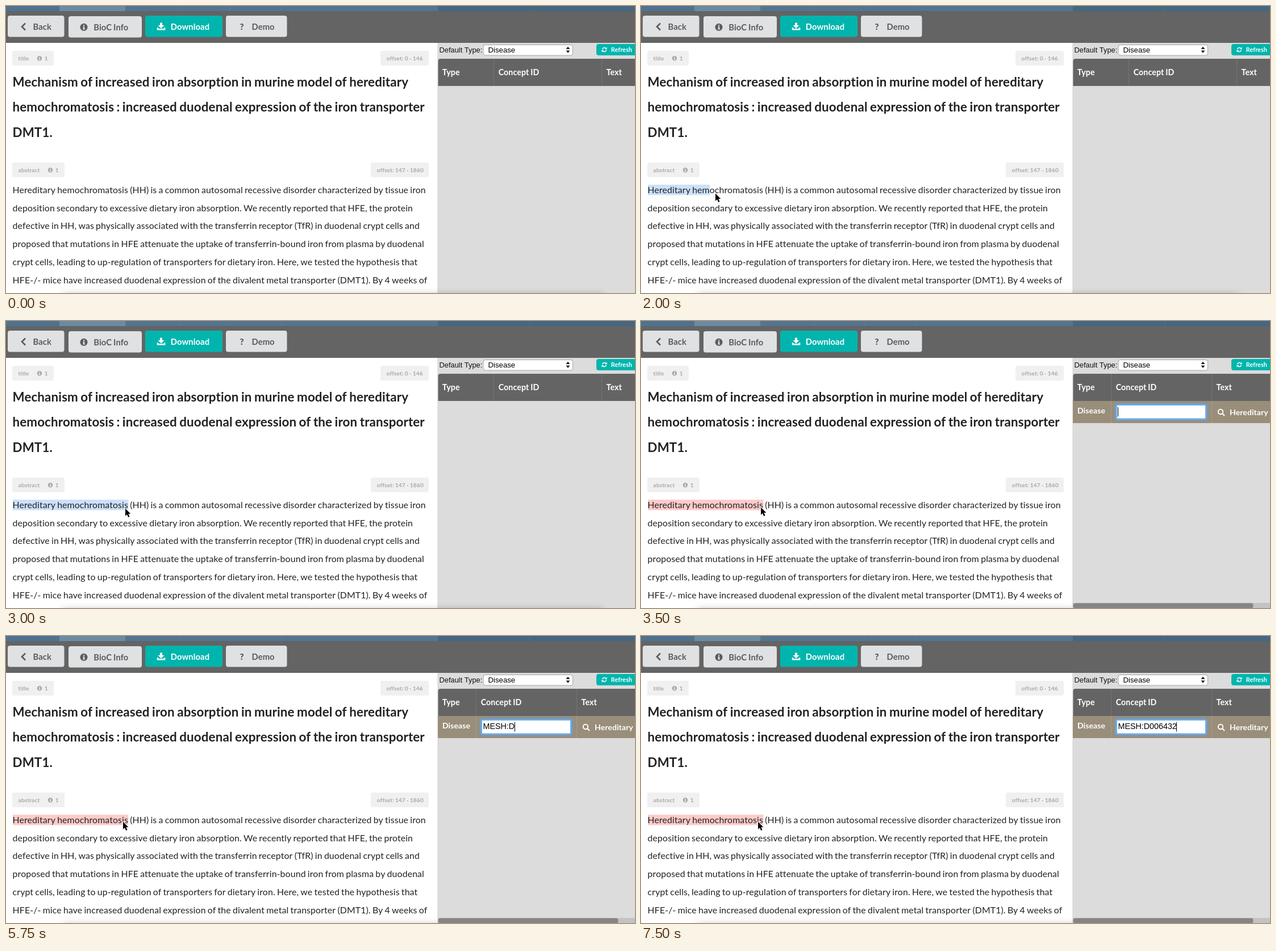
Animation of 1107x506 px, one loop 8 s. Source, as an HTML page with a canvas:

```html
<!DOCTYPE html>
<html lang="en">
<head>
<meta charset="utf-8">
<title>Annotation editor</title>
<style>
  html, body { margin: 0; width: 100%; height: 100%; overflow: hidden; background: #fff; }
  canvas { display: block; }
</style>
</head>
<body>
<canvas id="stage" width="1107" height="506"></canvas>
<script>
const ctx = document.getElementById('stage').getContext('2d');
const LOOP = 8000, ANNOTATED = 3500;
const INK = '#212121', GREY = '#646464', PANEL = '#dcdcdc', TEAL = '#00b5ad';
const BODY_SIZE = 15.85, SPACE_EM = 0.193;

const TITLE = [
  'Mechanism of increased iron absorption in murine model of hereditary',
  'hemochromatosis : increased duodenal expression of the iron transporter',
  'DMT1.'
];
const ABSTRACT = [
  'Hereditary hemochromatosis (HH) is a common autosomal recessive disorder characterized by tissue iron',
  'deposition secondary to excessive dietary iron absorption. We recently reported that HFE, the protein',
  'defective in HH, was physically associated with the transferrin receptor (TfR) in duodenal crypt cells and',
  'proposed that mutations in HFE attenuate the uptake of transferrin-bound iron from plasma by duodenal',
  'crypt cells, leading to up-regulation of transporters for dietary iron. Here, we tested the hypothesis that',
  'HFE-/- mice have increased duodenal expression of the divalent metal transporter (DMT1). By 4 weeks of'
];
const TERM = 'Hereditary hemochromatosis';
const CONCEPT = 'MESH:D006432';

// [time, pointer x, pointer y, selected characters]
const POINTER = [
  [500, -3, 305, 0], [750, 8.5, 319.5, 0], [1000, 10, 321, 0], [1250, 10.5, 329.5, 0],
  [1750, 44, 330.5, 3], [2000, 131, 330.5, 14], [2250, 180, 330.5, 20], [2500, 194, 330.5, 23],
  [2750, 203, 330.5, 24], [3000, 210, 330.5, 26], [3500, 211, 328.5, 26],
  [3750, 207, 328, 26], [4000, 206, 327.5, 26]
];
// [time, typed characters]
const TYPING = [
  [3500, 0], [4750, 2], [5000, 4], [5500, 5], [5750, 6],
  [6250, 7], [6500, 8], [7000, 9], [7250, 10], [7500, 12]
];

const stepAt = (steps, t) => steps.filter(s => s[0] <= t).pop();

function rect(x, y, w, h, color) {
  ctx.fillStyle = color;
  ctx.fillRect(x, y, w, h);
}

function rounded(x, y, w, h, r, color) {
  ctx.beginPath();
  ctx.roundRect(x, y, w, h, r);
  ctx.fillStyle = color;
  ctx.fill();
}

function useArial(size) {
  ctx.font = `${size}px "Liberation Sans", Arial, sans-serif`;
  ctx.letterSpacing = ctx.wordSpacing = '0px';
}

// Narrow word gaps and slightly open letters; any letter spacing also turns ligatures off.
function useLato(size, weight = 400) {
  ctx.font = `${weight} ${size}px Lato, sans-serif`;
  ctx.letterSpacing = ctx.wordSpacing = '0px';
  const slack = ctx.measureText(' ').width - SPACE_EM * size;
  ctx.letterSpacing = `${Math.max(0.01, slack * 0.12)}px`;
  ctx.wordSpacing = `${-slack}px`;
}

function text(str, x, y, color = INK) {
  ctx.fillStyle = color;
  ctx.fillText(str, x, y);
}

function bold(str, x, y, size, color) {
  useLato(size, 700);
  text(str, x, y, color);
}

function path(points, color, width) {
  ctx.beginPath();
  points.forEach(([x, y], i) => i ? ctx.lineTo(x, y) : ctx.moveTo(x, y));
  if (width) {
    ctx.strokeStyle = color;
    ctx.lineWidth = width;
    ctx.stroke();
  } else {
    ctx.fillStyle = color;
    ctx.fill();
  }
}

function arc(x, y, r, color, width, from = 0, to = Math.PI * 2) {
  ctx.beginPath();
  ctx.arc(x, y, r, from, to);
  ctx.strokeStyle = ctx.fillStyle = color;
  ctx.lineWidth = width;
  width ? ctx.stroke() : ctx.fill();
}

function infoIcon(x, y, r, color, hole) {
  const u = r / 6.5;
  arc(x, y, r, color);
  rect(x - u, y - 4.3 * u, 2.2 * u, 2 * u, hole);
  rect(x - 1.8 * u, y - 1.2 * u, 3 * u, 1.4 * u, hole);
  rect(x - u, y - 1.2 * u, 2.2 * u, 4.6 * u, hole);
  rect(x - 2 * u, y + 2.6 * u, 4.2 * u, 1.5 * u, hole);
}

function topBar() {
  rect(0, 0, 1107, 9, '#4f7290');
  rect(94, 0, 116, 9, '#6c8ba3');
  rect(210, 0, 550, 9, '#547591');
  rect(760, 0, 347, 9, '#456781');
  for (const x of [305, 393, 484, 921]) rect(x, 0, 1, 9, '#6883986b');
  rect(0, 9, 1107, 56, GREY);
  rect(0, 9, 1107, 1, '#5b646b');
}

function button(x, y, w, label, labelX, fill = '#e0e1e2', color = '#5a5b5c') {
  rounded(x, y, w, 37.5, 4, fill);
  bold(label, labelX, y + 24.5, 14.75, color);
}

function toolbar() {
  const ink = '#5a5b5c';
  button(3, 17, 99.5, 'Back', 47.5);
  path([[34, 30.5], [28, 36.5], [34, 42.5]], ink, 2.6);
  button(110, 18, 129, 'BioC Info', 154.3);
  infoIcon(137, 37.3, 6.5, ink, '#e0e1e2');
  button(245, 17, 136, 'Download', 289.8, TEAL, '#fff');
  rect(271, 29.5, 4, 5, '#fff');
  path([[267.5, 34], [278.5, 34], [273, 39.5]], '#fff');
  path([[267, 38], [267, 41.3], [279, 41.3], [279, 38]], '#fff', 2.6);
  button(387, 17, 107.5, 'Demo', 432.5);
  useLato(15, 900);
  text('?', 411.5, 41.7, ink);
}

function tag(x, y, w, label, counted) {
  const color = '#a9a9a9';
  rounded(x, y, w, 26, 3, '#f0f0f0');
  bold(label, x + 10.6, y + 16.7, 10.3, color);
  if (!counted) return;
  infoIcon(x + w - 25, y + 13.3, 4.2, color, '#f0f0f0');
  bold('1', x + w - 16.3, y + 16.7, 10.3, color);
}

function article(t) {
  rect(0, 65, 760, 441, '#fff');
  tag(11, 79, 73, 'title', true);
  tag(659, 79, 85, 'offset: 0 - 146');
  tag(11, 276, 92, 'abstract', true);
  tag(642, 276, 102, 'offset: 147 - 1860');
  TITLE.forEach((line, i) => bold(line, 11.5, 142 + i * 44.4, 22.35, INK));

  useLato(BODY_SIZE);
  const pointer = stepAt(POINTER, t);
  if (pointer && pointer[3]) {
    const width = ctx.measureText(TERM.slice(0, pointer[3])).width;
    rect(12, 315, width, 18.5, t < ANNOTATED ? '#cbe1fb' : '#ffcbca');
  }
  ABSTRACT.forEach((line, i) => text(line, 11.6, 330 + i * 31.7));
}

function refreshIcon(x, y) {
  arc(x, y, 3.5, '#fff', 1.5, Math.PI * 1.05, Math.PI * 1.8);
  arc(x, y, 3.5, '#fff', 1.5, Math.PI * 0.05, Math.PI * 0.8);
  path([[x + 4.6, y - 4.6], [x + 4.6, y - 0.8], [x + 0.9, y - 0.8]], '#fff');
  path([[x - 4.6, y + 4.6], [x - 4.6, y + 0.8], [x - 0.9, y + 0.8]], '#fff');
}

function typeChooser() {
  useArial(12.87);
  text('Default Type:', 762.5, 81.5, '#111');
  rounded(839.5, 68, 158.5, 19.5, 4.5, '#a5a5a5');
  rounded(840.5, 69, 156.5, 17.5, 3.5, '#fff');
  useArial(13.2);
  text('Disease', 848.5, 82, '#000');
  path([[985.5, 76], [989, 71.5], [992.5, 76]], '#222');
  path([[985.5, 78.5], [989, 83], [992.5, 78.5]], '#222');
  rounded(1039, 67, 80, 20, 4, TEAL);
  refreshIcon(1053, 77);
  bold('Refresh', 1064.8, 81, 10.8, '#fff');
}

function tableHead(conceptX, textX) {
  rounded(760.5, 93, 360, 48, [4, 0, 0, 0], GREY);
  for (const x of [conceptX, textX]) rect(x, 93, 1, 48, '#747474');
  bold('Type', 767.8, 122.3, 14.2, '#fff');
  bold('Concept ID', conceptX + 8.8, 122.3, 14.2, '#fff');
  bold('Text', textX + 8.6, 122.3, 14.2, '#fff');
}

function conceptInput(t) {
  ctx.save();
  ctx.shadowColor = '#5aa5f2';
  ctx.shadowBlur = 5;
  rounded(835.5, 146.5, 160, 27.5, 3, '#6aaef2');
  ctx.restore();
  rect(838, 149, 155, 22.5, '#fff');

  const typed = CONCEPT.slice(0, stepAt(TYPING, t)[1]);
  useArial(14.3);
  text(typed, 839.5, 164.3, '#000');
  const blinkedOff = t >= 4000 && t < 4500;
  if (!blinkedOff) rect(Math.round(839 + ctx.measureText(typed).width), 152, 1, 16.5, '#000');
}

function annotationRow(t) {
  rect(760, 141, 347, 39, '#998e7a');
  for (const x of [827, 1004]) rect(x, 141, 1, 39, '#a59b89');
  bold('Disease', 768, 163.3, 14, '#fff');
  conceptInput(t);
  arc(1020, 160, 4.2, '#fff', 1.9);
  path([[1023, 163], [1027, 167]], '#fff', 2.2);
  bold('Hereditary', 1036, 165.5, 14, '#fff');
}

function sidePanel(t) {
  rect(760, 65, 347, 441, PANEL);
  rect(759.5, 65, 1, 441, '#d0d0d0');
  typeChooser();
  if (t < ANNOTATED) {
    tableHead(858, 1048);
  } else {
    tableHead(827, 1004);
    annotationRow(t);
  }
}

// Only the soft upper edge of a shape below the stage is visible.
function bottomShade() {
  ctx.save();
  ctx.shadowColor = 'rgba(0,0,0,.35)';
  ctx.shadowBlur = 14;
  rect(100, 510, 950, 30, '#000');
  ctx.restore();
}

function scrollbar() {
  rect(760, 497, 347, 9, '#c3c3c3');
  rounded(760.5, 497.5, 317, 9, 4, '#858585');
}

function arrow(x, y) {
  ctx.save();
  ctx.translate(x, y);
  const shape = [[0, 0], [0, 13.2], [3, 10.5], [5.2, 15.6], [7.5, 14.6], [5.3, 9.6], [9.3, 9.4]];
  ctx.lineJoin = 'round';
  path([...shape, shape[0]], '#fff', 2.2);
  path(shape, '#000');
  ctx.restore();
}

function draw(t) {
  topBar();
  toolbar();
  article(t);
  sidePanel(t);
  bottomShade();
  if (t >= ANNOTATED) scrollbar();
  const pointer = stepAt(POINTER, t);
  if (pointer) arrow(pointer[1], pointer[2]);
}

const start = performance.now();
function tick() {
  draw((performance.now() - start) % LOOP);
  requestAnimationFrame(tick);
}
tick();
</script>
</body>
</html>
```
